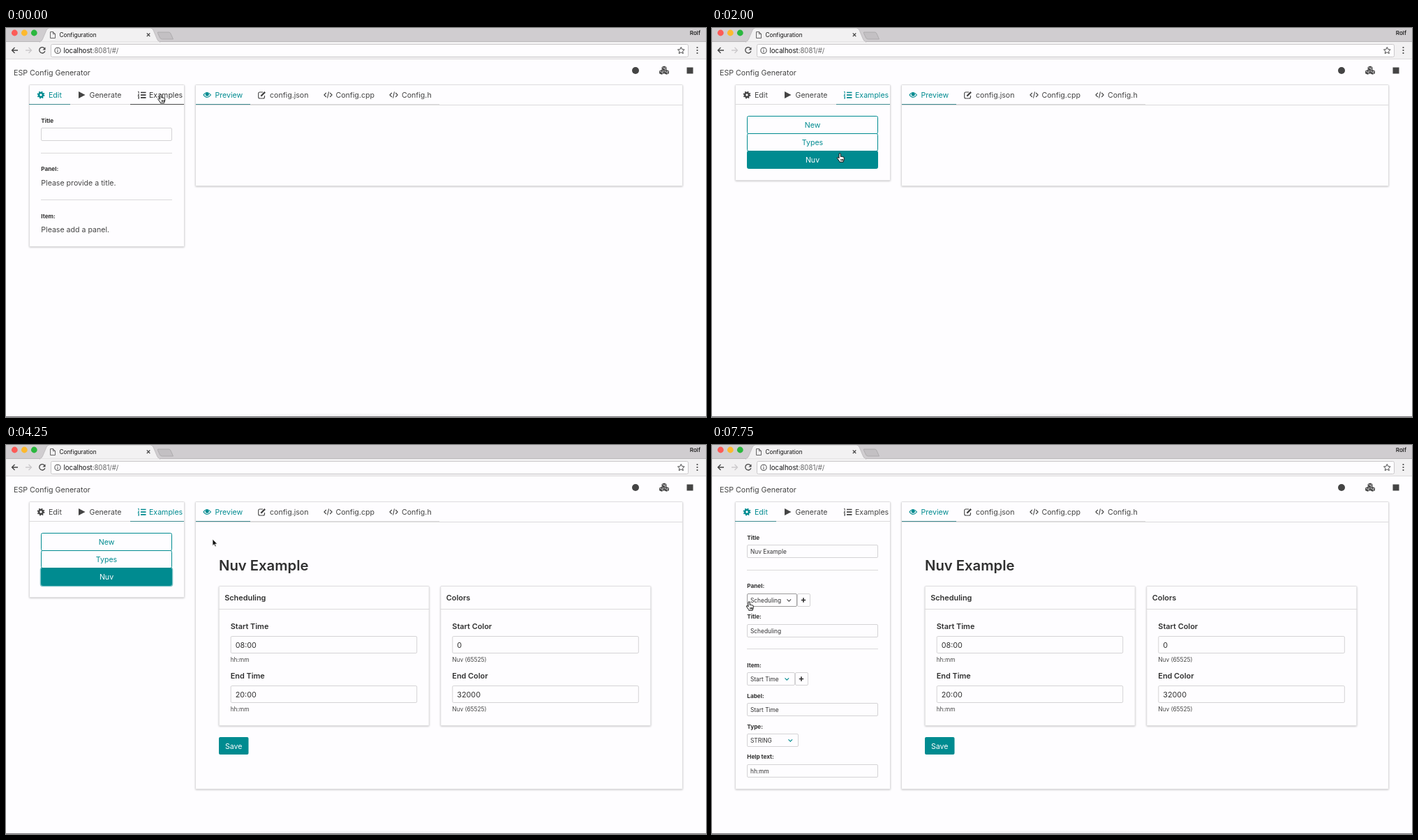
An HTML page for the animation above (8000 ms loop, 1003x558 px).

```html
<!DOCTYPE html>
<html lang="en">
<head>
<meta charset="utf-8">
<title>Configuration</title>
<style>
  html, body { margin: 0; width: 100%; height: 100%; overflow: hidden; background: #fefdff; }
  svg { display: block; width: 1003px; height: 558px; font-family: Inter, Roboto, sans-serif; }
  .card { fill: #fefdff; stroke: #dfdee0; filter: drop-shadow(0 1px 1px rgba(10, 10, 10, .2)); }
  .field { fill: #fefdff; stroke: #d4d3d5; }
  .field.hover { stroke: #9c9b9c; }
  .tab { color: #444; --line: #dbdadb; }
  .tab.hover { color: #363636; --line: #4a4a4a; }
  .tab.on { color: #008b90; --line: #3f8b90; }
  .tab .under { fill: var(--line); }
  .option { --back: #fefdff; --ink: #008b90; }
  .option.hover { --back: #008b90; --ink: #fefdff; }
  .option rect { fill: var(--back); stroke: #008b90; }
  .option text { fill: var(--ink); }
  .chevron { fill: none; stroke: #008b90; stroke-width: 1.1; }
  .chevron.hover { stroke: #4a4a4a; }
</style>
</head>
<body>
<svg id="stage" viewBox="0 0 1003 558"></svg>
<script>
const LOOP = 8000;
const TEAL = '#008b90', INK = '#444', DARK = '#303030', PAGE = '#fefdff';
const BRAND = 'Nuv', USER = 'Rolf';

// y is the middle of the capital letters
const text = (x, y, s, size = 10.6, fill = INK, weight = 400, anchor = 'start') =>
  `<text x="${x}" y="${y + size * 0.36}" font-size="${size}" fill="${fill}" font-weight="${weight}" text-anchor="${anchor}">${s}</text>`;
const rect = (x, y, w, h, attrs = '') =>
  `<rect x="${x}" y="${y}" width="${w}" height="${h}" ${attrs}/>`;
const line = (d, stroke = INK, width = 1.2) =>
  `<path d="${d}" fill="none" stroke="${stroke}" stroke-width="${width}"/>`;
const group = (id, body) => `<g id="${id}">${body}</g>`;
const card = (x, y, w, h, id) =>
  rect(x + .5, y + .5, w - 1, h - 1, `class="card" rx="1" ${id ? `id="${id}"` : ''}`);
const field = (x, y, w, h, id) =>
  rect(x + .5, y + .5, w - 1, h - 1, `class="field" rx="1.5" ${id ? `id="${id}"` : ''}`);
const rule = (x, y, w) => rect(x, y, w, 1, 'fill="#dbdadb"');
const label = (y, s) => text(50.3, y, s, 8.2, DARK, 700);

const icons = {
  gear: x => `<circle cx="${x + 5}" cy="96" r="2.9" fill="none" stroke="currentColor" stroke-width="2.5"/>
    <circle cx="${x + 5}" cy="96" r="4.5" fill="none" stroke="currentColor" stroke-width="1.8" stroke-dasharray="1.77"/>`,
  play: x => `<path d="M${x} 91l9.5 5-9.5 5z" fill="currentColor"/>`,
  list: x => line(`M${x + 4} 92.5h7.5m-7.5 3.7h7.5m-7.5 3.7h7.5`, 'currentColor', 1.7) +
    line(`M${x} 91.3h1.2v2.6M${x} 95.3h1.8l-1.8 2h2M${x} 99h2l-1 1 1 1h-2`, 'currentColor', .9),
  eye: x => line(`M${x + .5} 96q5-7 10.5 0q-5.5 7-10.5 0z`, 'currentColor', 1.1) +
    `<circle cx="${x + 5.7}" cy="95.3" r="2.5" fill="currentColor"/>`,
  pencil: x => line(`M${x + 7} 92h-4.3q-2 0-2 2v5q0 2 2 2h4.8q2 0 2-2v-2`, 'currentColor', 1.1) +
    line(`M${x + 4.3} 97.7l5.8-5.8`, 'currentColor', 2.3),
  code: x => line(`M${x + 3.3} 93l-2.9 3 2.9 3m5.4-6l2.9 3-2.9 3m-1.7-7.5l-2 9`, 'currentColor', 1.1),
};
const tab = (id, x0, x1, icon, iconX, textX, name) =>
  `<g id="${id}" class="tab">${rect(x0, 109, x1 - x0, 1, 'class="under"')}${icons[icon](iconX)}${text(textX, 96, name, 10.6, 'currentColor')}</g>`;

const browser = () => {
  const lights = ['#fc5b57', '#fdb92e', '#2ab73e'].map((c, i) =>
    `<circle cx="${12.3 + 14 * i}" cy="7" r="4.4" fill="${c}"/>`).join('');
  const dots = [28, 32, 36].map(y => `<circle cx="990.5" cy="${y}" r="1.1" fill="#444"/>`).join('');
  return rect(0, 0, 1003, 20, 'fill="#d0cdd0"') + rect(0, 19, 1003, 1, 'fill="#bab7ba"') +
    rect(0, 20, 1003, 25, 'fill="#f2f1f2"') + rect(0, 44, 1003, 1, 'fill="#dddbdd"') +
    '<path d="M48 20q3-.5 4.5-4l5.5-13q1.5-3 4-3h145q2.5 0 4 3l5.5 13q1.5 3.5 4.5 4z" fill="#f2f1f2" stroke="#b5b2b5" stroke-width=".7"/>' +
    rect(49, 19.7, 171, 1.3, 'fill="#f2f1f2"') +
    '<path d="M217.5 6h15.5q2 0 3 2l3.5 8h-16q-2 0-3-2l-3-6.5z" fill="#c3c0c3" stroke="#a8a5a8" stroke-width=".8"/>' +
    lights +
    line('M63.5 5.5h4l3 3v6h-7zM67.5 5.5v3h3', '#555', .9) +
    text(76.5, 9.7, 'Configuration', 8.25, '#111') +
    line('M201.8 7.5l4.5 4.5m0-4.5l-4.5 4.5', '#444', 1.1) +
    text(995, 7.5, USER, 8.2, '#111', 500, 'end') +
    line('M17 32H8.5m4-4l-4 4 4 4', '#444', 1.3) +
    line('M28 32h8.5m-4-4l4 4-4 4', '#cbc9cb', 1.3) +
    line('M55.5 29.5a4.2 4.2 0 1 0 .4 3.8', '#444', 1.3) +
    '<path d="M56.5 27.5v4h-4z" fill="#444"/>' +
    rect(64.5, 23.5, 913, 18, 'rx="2" fill="#fefdff" stroke="#cac8ca"') +
    '<circle cx="74" cy="32.3" r="4.1" fill="none" stroke="#444"/>' +
    line('M74 31.7v3m0-5v1', '#444', 1) +
    text(82.5, 32.3, '<tspan fill="#111">localhost</tspan>:8081/#/', 9.65, '#666') +
    '<path d="M967.3 27.5l1.4 3.1 3.4.4-2.5 2.3.7 3.3-3-1.7-3 1.7.7-3.3-2.5-2.3 3.4-.4z" fill="none" stroke="#444"/>' +
    dots;
};

const cube = (x, y) =>
  `<path d="M${x} ${y - 3.4}l3.4 1.5v3.7l-3.4 1.5-3.4-1.5v-3.7z" fill="${INK}"/>` +
  line(`M${x - 2.5} ${y - 1.3}l2.5 1.1 2.5-1.1M${x + 1.3} ${y + 2}v-2`, PAGE, .8);

const header = () => text(11, 63.7, 'ESP Config Generator', 10.65) +
  `<circle cx="902" cy="61" r="5" fill="${INK}"/>` +
  cube(943, 58) + cube(939.5, 63.5) + cube(946.5, 63.5) +
  rect(975.5, 56.5, 9, 9, `fill="${INK}"`);

const select = (y, w, value, id) => field(50, y, w, 19, id) +
  text(55, y + 9.5, value, 8.35, DARK) +
  `<path id="${id}Arrow" class="chevron" d="M${50 + w - 14.5} ${y + 8.3}l2.8 2.8 2.8-2.8"/>`;
const plus = (x, y) => field(x, y, 19, 19) +
  line(`M${x + 5.8} ${y + 9.5}h6.4m-3.2-3.2v6.4`, DARK, 1.6);
const entry = (y, value) => field(50, y, 188, 19) + text(55, y + 9.5, value, 8.35, DARK);

const editCommon = label(132.7, 'Title') + field(50, 143, 188, 19, 'titleField') +
  rule(50, 179, 188) + label(202.3, 'Panel:');
const editEmpty = text(50.3, 221.8, 'Please provide a title.') + rule(50, 246, 188) +
  label(270, 'Item:') + text(50.3, 289.3, 'Please add a panel.');
const editFull = text(55, 152.5, BRAND + ' Example', 8.35, DARK) +
  select(213, 72, 'Scheduling', 'panelPick') + plus(122, 213) +
  label(246, 'Title:') + entry(257, 'Scheduling') + rule(50, 292, 188) +
  label(316, 'Item:') + select(326, 69, 'Start Time', 'itemPick') + plus(119, 326) +
  label(359.7, 'Label:') + entry(370, 'Start Time') +
  label(403.7, 'Type:') + select(414, 74, 'STRING', 'typePick') +
  label(447.3, 'Help text:') + entry(458, 'hh:mm');

const options = rect(49.5, 176, 189, 26.5, 'id="ring" rx="3" fill="none" stroke="#7fc4c8" stroke-width="1.6"') +
  ['New', 'Types', BRAND].map((name, i) =>
    `<g id="option${i}" class="option">${rect(50.5, 126.5 + 25 * i, 187, 25, 'rx="2"')}${text(144, 139.5 + 25 * i, name, 10.6, '', 400, 'middle')}</g>`).join('');

const previewCard = (x, title, items) => card(x, 202, 302, 201) + rule(x, 235, 302) +
  text(x + 8.5, 219, title, 10.9, DARK, 600) +
  items.map(([name, value, hint], i) => {
    const y = 71 * i;
    return text(x + 17, 260.5 + y, name, 10.9, DARK, 600) + field(x + 17, 274 + y, 267.5, 25) +
      text(x + 24, 287 + y, value, 10.8, DARK) + text(x + 17, 308 + y, hint, 8.3);
  }).join('');
const colorHint = BRAND + ' (65525)';
const preview = text(305, 173, BRAND + ' Example', 20.3, DARK, 600) +
  previewCard(304.7, 'Scheduling', [['Start Time', '08:00', 'hh:mm'], ['End Time', '20:00', 'hh:mm']]) +
  previewCard(622.3, 'Colors', [['Start Color', '0', colorHint], ['End Color', '32000', colorHint]]) +
  rect(305, 419, 42.5, 25, `rx="2" fill="${TEAL}"`) + text(326.3, 431.7, 'Save', 10.6, PAGE, 400, 'middle');

const cursors =
  '<path id="hand" d="M-1 1q0-1.3 1.1-1.3t1.2 1.3v3.5q.9-.7 1.7.2.9-.6 1.7.3 1.5-.4 1.5 1.2v2.3q0 1.500-1 2.700v1h-5.500v-.8l-3-4.200q-.9-1.500.3-1.700.8 0 2 1.400zM1.800 8v2.500M3.300 8v2.500M4.800 8v2.500" fill="#fff" stroke="#111" stroke-width="1"/>' +
  '<path id="arrow" d="M0 0v9.5l2.2-2 1.5 3.5 1.5-.7-1.5-3.300h3z" fill="#111" stroke="#fff" stroke-width=".7"/>' +
  '<path id="beam" d="M-2-5q2 0 2 1.500v7q0 1.500-2 1.500M2-5q-2 0-2 1.500v7q0 1.500 2 1.500" fill="none" stroke="#222" stroke-width=".9"/>';

const stage = document.getElementById('stage');
stage.innerHTML = `<defs><radialGradient id="glow"><stop stop-color="#777" stop-opacity=".16"/><stop offset="1" stop-color="#777" stop-opacity="0"/></radialGradient></defs>` +
  rect(0, 0, 1003, 558, `fill="${PAGE}"`) + browser() + header() +
  card(33, 81, 223, 233, 'leftCard') + rule(33, 109, 222) +
  tab('edit', 33, 92, 'gear', 45, 61, 'Edit') +
  tab('generate', 92, 178, 'play', 104, 119.5, 'Generate') +
  tab('examples', 178, 255, 'list', 189, 205, 'Examples') +
  group('editForm', editCommon + group('emptyForm', editEmpty) + group('fullForm', editFull)) +
  group('optionList', options) +
  card(271, 81, 699, 146, 'rightCard') + rule(272, 110, 697) +
  tab('preview', 272, 350, 'eye', 282.5, 299.5, 'Preview') +
  tab('json', 350, 445, 'pencil', 361, 378, 'config.json') +
  tab('cpp', 445, 539, 'code', 455.5, 472.5, 'Config.cpp') +
  tab('header', 539, 621, 'code', 549.5, 567, 'Config.h') +
  group('previewBody', preview) +
  '<ellipse cx="501" cy="558" rx="255" ry="6" fill="url(#glow)"/>' +
  rect(0, 557, 1003, 1, 'fill="#77757a"') +
  group('pointer', cursors);

const $ = id => document.getElementById(id);
const show = (id, on) => $(id).setAttribute('display', on ? 'inline' : 'none');
const mark = (id, name, on) => $(id).classList.toggle(name, on);

// [time, x, y, shape, hovered element]
const moves = [
  [0, 221.5, 95.5, 'hand', 'examples'],
  [1000, 235, 117, 'arrow', ''],
  [1250, 216, 133, 'hand', 'option0'],
  [1500, 194.5, 148.8, 'hand', 'option0'],
  [1750, 187, 165, 'hand', 'option1'],
  [2000, 183, 180, 'hand', 'option2'],
  [2250, 181.3, 185.5, 'hand', 'option2'],
  [3500, 181.3, 186, 'hand', 'option2'],
  [4000, 246, 162, 'arrow', ''],
  [4250, 296, 135, 'arrow', ''],
  [4500, 296, 93, 'hand', 'preview'],
  [4750, 236, 94, 'hand', 'examples'],
  [5000, 132, 95, 'hand', 'generate'],
  [5250, 55.5, 95.8, 'hand', 'edit'],
  [7000, 56, 113, 'arrow', ''],
  [7250, 57, 153, 'beam', 'titleField'],
  [7500, 55, 194, 'arrow', ''],
  [7750, 53, 225, 'hand', 'panelPick'],
];
const hoverable = ['edit', 'generate', 'examples', 'preview', 'option0', 'option1', 'option2', 'titleField', 'panelPick'];
mark('preview', 'on', true);

function draw(t) {
  const [, x, y, shape, hovered] = moves.filter(m => m[0] <= t).pop();
  const listing = t >= 250 && t < 5500;
  const loaded = t >= 2750;

  $('pointer').setAttribute('transform', `translate(${x} ${y})`);
  ['hand', 'arrow', 'beam'].forEach(id => show(id, id === shape));
  hoverable.forEach(id => mark(id, 'hover', id === hovered));
  mark('panelPickArrow', 'hover', hovered === 'panelPick');
  // the last chosen option keeps its focus fill
  if (loaded && listing) mark('option2', 'hover', true);

  mark('edit', 'on', !listing);
  mark('examples', 'on', listing);
  show('optionList', listing);
  show('ring', loaded);
  show('editForm', !listing);
  show('emptyForm', !loaded);
  show('fullForm', loaded);
  show('previewBody', loaded);
  $('leftCard').setAttribute('height', listing ? 137 : loaded ? 412 : 232);
  $('rightCard').setAttribute('height', loaded ? 412 : 145);
}

const start = performance.now();
function tick() {
  draw((performance.now() - start) % LOOP);
  requestAnimationFrame(tick);
}
tick();
</script>
</body>
</html>
```
